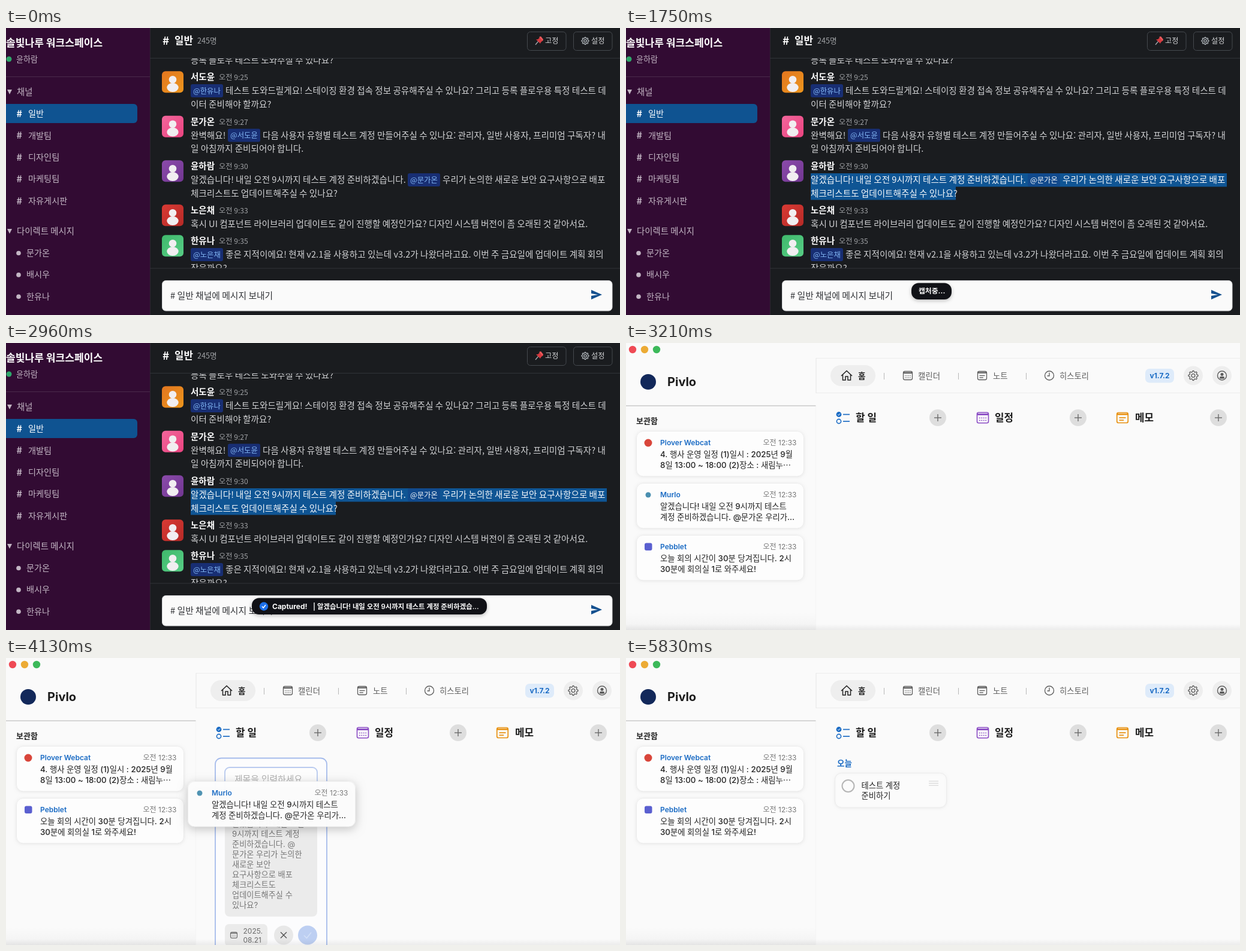
Animation, 1024 px wide and 480 px high, one loop 8000 ms. Source, as an HTML page with a canvas:

```html
<!DOCTYPE html>
<html lang="ko">
<head>
<meta charset="utf-8">
<style>
html, body { margin: 0; width: 100%; height: 100%; overflow: hidden; background: #fafafa; }
canvas { display: block; width: 1024px; height: 480px; }
</style>
</head>
<body>
<canvas id="stage" width="1024" height="480"></canvas>
<script>
const ctx = document.getElementById('stage').getContext('2d');
const LOOP = 8000;
const HANGUL = '"Noto Sans CJK KR", "Noto Sans CJK", "Noto Sans CJK JP", sans-serif';
const UI = 'Inter, ' + HANGUL;
const BLUE = '#1a6bc4';
let family = HANGUL;

// ---- helpers -------------------------------------------------------------
const ramp = (t, from, to) => {
  const p = Math.min(1, Math.max(0, (t - from) / (to - from)));
  return p * p * (3 - 2 * p);
};
const mix = (a, b, p) => a + (b - a) * p;

// cy is the optical middle of the glyphs
function text(str, x, cy, size, color, weight = 400, align = 'left') {
  ctx.font = `${weight} ${size}px ${family}`;
  ctx.textAlign = align;
  ctx.fillStyle = color;
  ctx.fillText(str, x, cy + size * 0.37);
}
function paint(fill, stroke, width = 1) {
  if (fill) { ctx.fillStyle = fill; ctx.fill(); }
  if (stroke) { ctx.strokeStyle = stroke; ctx.lineWidth = width; ctx.stroke(); }
}
function box(x, y, w, h, r, fill, stroke, width) {
  ctx.beginPath();
  ctx.roundRect(x, y, w, h, r);
  paint(fill, stroke, width);
}
function disc(x, y, r, fill, stroke, width) {
  ctx.beginPath();
  ctx.arc(x, y, r, 0, Math.PI * 2);
  paint(fill, stroke, width);
}
function path(points, fill, stroke, width) {
  ctx.beginPath();
  points.forEach(([x, y], i) => i ? ctx.lineTo(x, y) : ctx.moveTo(x, y));
  paint(fill, stroke, width);
}
const line = (x1, y1, x2, y2, color, width = 1) => path([[x1, y1], [x2, y2]], null, color, width);
function layer(alpha, draw) {
  ctx.save();
  ctx.globalAlpha *= alpha;
  draw();
  ctx.restore();
}
function shadow(color, blur, dy, draw) {
  ctx.save();
  ctx.shadowColor = color;
  ctx.shadowBlur = blur;
  ctx.shadowOffsetY = dy;
  draw();
  ctx.restore();
}
function shade(x, y, w, h, alpha) {
  const g = ctx.createLinearGradient(0, y, 0, y + h);
  g.addColorStop(0, 'rgba(0,0,0,0)');
  g.addColorStop(1, `rgba(0,0,0,${alpha})`);
  ctx.fillStyle = g;
  ctx.fillRect(x, y, w, h);
}
function gear(x, y, r, color) {
  ctx.beginPath();
  for (let i = 0; i <= 64; i++) {
    const a = i / 64 * Math.PI * 2;
    const d = r * (0.88 + 0.12 * Math.tanh(3 * Math.cos(8 * a)));
    ctx.lineTo(x + d * Math.cos(a), y + d * Math.sin(a));
  }
  paint(null, color, 1.3);
  disc(x, y, r * 0.36, null, color, 1.3);
}

// ---- chat ----------------------------------------------------------------
const CHANNELS = ['일반', '개발팀', '디자인팀', '마케팅팀', '자유게시판'];
const CONTACTS = ['문가온', '배시우', '한유나'];
const SELECTED = [
  [308, 254, '알겠습니다! 내일 오전 9시까지 테스트 계정 준비하겠습니다.'],
  [670, 254, '@문가온'],
  [728, 254, '우리가 논의한 새로운 보안 요구사항으로 배포'],
  [308, 276.5, '체크리스트도 업데이트해주실 수 있나요?'],
];
const MESSAGES = [
  { y: 82, name: '서도윤', time: '9:25', colors: ['#e27620', '#ec951c'], parts: [
    [308, 105, '@한유나'],
    [366, 105, '테스트 도와드릴게요! 스테이징 환경 접속 정보 공유해주실 수 있나요? 그리고 등록 플로우용 특정 테스트 데'],
    [308, 128, '이터 준비해야 할까요?']] },
  { y: 156.5, name: '문가온', time: '9:27', colors: ['#f2669c', '#ea437f'], parts: [
    [308, 179.5, '완벽해요!'],
    [370, 179.5, '@서도윤'],
    [428, 179.5, '다음 사용자 유형별 테스트 계정 만들어주실 수 있나요: 관리자, 일반 사용자, 프리미엄 구독자? 내'],
    [308, 202, '일 아침까지 준비되어야 합니다.']] },
  { y: 231, name: '윤하람', time: '9:30', colors: ['#8b4bab', '#713691'], parts: SELECTED },
  { y: 305, name: '노은채', time: '9:33', colors: ['#d93a34', '#b52a27'], parts: [
    [308, 328, '혹시 UI 컴포넌트 라이브러리 업데이트도 같이 진행할 예정인가요? 디자인 시스템 버전이 좀 오래된 것 같아서요.']] },
  { y: 356, name: '한유나', time: '9:35', colors: ['#3fb96c', '#57cd85'], parts: [
    [308, 379, '@노은채'],
    [366, 379, '좋은 지적이에요! 현재 v2.1을 사용하고 있는데 v3.2가 나왔더라고요. 이번 주 금요일에 업데이트 계획 회의'],
    [308, 402, '잡을까요?']] },
];

function messageParts(parts, color, pill, pillText) {
  for (const [x, y, str] of parts) {
    if (str[0] === '@') {
      box(x, y - 11, 54, 22, 3, pill);
      text(str, x + 4, y, 12.4, pillText, 500);
    } else text(str, x, y, 14.6, color);
  }
}
function avatar(x, y, colors) {
  const g = ctx.createLinearGradient(x, y, x + 36, y + 36);
  colors.forEach((c, i) => g.addColorStop(i, c));
  box(x, y, 36, 36, 6, g);
  disc(x + 18, y + 14, 6.3, '#f1eef1');
  ctx.beginPath();
  ctx.ellipse(x + 18, y + 27.3, 9.7, 7.6, 0, 0, Math.PI * 2);
  paint('#f1eef1');
}
function selection(p) {
  if (p <= 0) return;
  const reach = p * 936;
  ctx.save();
  ctx.beginPath();
  ctx.rect(308, 243, Math.min(694, reach), 22.5);
  if (reach > 694) ctx.rect(308, 265.5, reach - 694, 22);
  ctx.clip();
  ctx.fillStyle = '#0f5594';
  ctx.fillRect(308, 243, 694, 45);
  messageParts(SELECTED, '#f4f7fa', '#114a8d', '#f4f7fa');
  ctx.restore();
}
function sidebar() {
  ctx.fillStyle = '#320b33';
  ctx.fillRect(0, 0, 240, 480);
  text('솔빛나루 워크스페이스', 0, 25, 17.1, '#fff', 700);
  disc(5, 52, 4.5, '#2ea86b');
  text('윤하람', 17, 52, 13.1, '#c3b6c4');
  line(0, 81.5, 240, 81.5, '#4a2a4b');
  const heading = (str, y) => {
    path([[2, y - 4], [10, y - 4], [6, y + 4]], '#c3b6c4');
    text(str, 18, y, 14.4, '#c3b6c4');
  };
  heading('채널', 107);
  heading('다이렉트 메시지', 340);
  box(-6, 127, 225, 32, 6, '#0f5391');
  CHANNELS.forEach((name, i) => {
    const y = 143 + i * 36.4, color = i ? '#c3b6c4' : '#fff';
    text('#', 17.5, y, 16, color, 700);
    text(name, 37, y, 14.2, color);
  });
  CONTACTS.forEach((name, i) => {
    const y = 375.5 + i * 36.4;
    disc(21, y + 1, 3.8, '#c3b6c4');
    text(name, 34, y, 14.2, '#c3b6c4');
  });
}
function chatHeader() {
  text('#', 261, 21, 19, '#fff', 700);
  text('일반', 281, 21, 16.8, '#fff', 700);
  text('245명', 319, 21.5, 12.6, '#a3a5a8');
  line(240, 50.5, 1024, 50.5, '#303338');
  [[870, '고정'], [947, '설정']].forEach(([x, label]) => {
    box(x - 0.5, 6.5, 64.5, 31, 5, null, '#45494e');
    text(label, x + 29, 21.5, 12.2, '#d4d5d7');
  });
  line(883, 28, 888, 22, '#a8adb3', 1.2);
  path([[884, 19], [887, 19], [890, 16], [895, 21], [892, 24], [891, 26]], '#d63a3f');
  path([[889, 15], [892, 14], [896, 19], [895, 22]], '#ef5a5c');
  gear(966, 21.5, 6, '#aeb4b9');
}
function composer() {
  line(240, 402, 1024, 402, '#303338');
  box(260.5, 422.5, 750.5, 50.5, 6, '#fafafa', '#d5d6d8');
  text('# 일반 채널에 메시지 보내기', 274, 448, 14.8, '#303236');
  path([[976, 438], [994, 446], [976, 454], [976, 448], [987, 446], [976, 444]], '#14508f');
}
function toast(t) {
  family = UI;
  const pill = (x, w) => shadow('rgba(0,0,0,.25)', 6, 2, () => box(x, 426.5, w, 27.5, 12, '#111217'));
  if (t >= 1560 && t < 2140) layer(ramp(t, 1560, 1700), () => {
    pill(476, 67);
    text('캡처중...', 488, 440, 11.8, '#fff', 700);
  });
  if (t >= 2140) layer(ramp(t, 2140, 2240), () => {
    pill(410, 392);
    disc(430, 440.5, 7.2, '#1c6fe8');
    path([[427, 440.5], [429.2, 443], [433, 438]], null, '#fff', 1.5);
    text('Captured!', 444, 440.5, 12, '#fff', 700);
    text('| 알겠습니다! 내일 오전 9시까지 테스트 계정 준비하겠습...', 512, 440.5, 11.4, '#fff', 600);
  });
}
function chat(t) {
  family = HANGUL;
  ctx.fillStyle = '#1a1c1f';
  ctx.fillRect(0, 0, 1024, 480);
  sidebar();
  line(240.5, 0, 240.5, 480, '#2d2530');
  chatHeader();
  ctx.save();
  ctx.beginPath();
  ctx.rect(241, 51, 783, 350.5);
  ctx.clip();
  text('등록 플로우 테스트 도와주실 수 있나요?', 308, 54, 14.6, '#d2d3d5');
  for (const m of MESSAGES) {
    avatar(260, m.y - 9.8, m.colors);
    text(m.name, 308, m.y, 14.5, '#fff', 700);
    text('오전 ' + m.time, 355, m.y + 0.8, 12.2, '#9fa1a4');
    messageParts(m.parts, '#d2d3d5', '#182e73', '#82b7f5');
  }
  selection(ramp(t, 240, 880));
  ctx.restore();
  composer();
  toast(t);
}

// ---- organiser -----------------------------------------------------------
const CLIPS = {
  web: { app: 'Plover Webcat', logo: () => disc(20, 20, 6.5, '#d9463b'),
    lines: ['4. 행사 운영 일정 (1)일시 : 2025년 9월', '8일 13:00 ~ 18:00 (2)장소 : 새림누⋯'] },
  chat: { app: 'Murlo', logo: () => disc(20, 20, 4.5, '#4a8fb0'),
    lines: ['알겠습니다! 내일 오전 9시까지 테스트', '계정 준비하겠습니다. @문가온 우리가...'] },
  call: { app: 'Pebblet', logo: () => box(14, 13.5, 12.5, 12.5, 3, '#5a5fd0'),
    lines: ['오늘 회의 시간이 30분 당겨집니다. 2시', '30분에 회의실 1로 와주세요!'] },
};
const NOTE = ['알겠습니다! 내일 오전', '9시까지 테스트 계정', '준비하겠습니다. @', '문가온 우리가 논의한',
  '새로운 보안', '요구사항으로 배포', '체크리스트도', '업데이트해주실 수', '있나요?'];
const TITLE = ['테스트 계정', '준비하기'];

function clip(item, x, y, { scale = 1, alpha = 1, lifted = false } = {}) {
  layer(alpha, () => {
    ctx.translate(x + 140, y + 38);
    ctx.scale(scale, scale);
    ctx.translate(-140, -38);
    shadow(lifted ? 'rgba(0,0,0,.24)' : 'rgba(0,0,0,.08)', lifted ? 16 : 5, lifted ? 4 : 1,
      () => box(0, 0, 280, 76, 11, '#fdfdfd'));
    box(0.5, 0.5, 279, 75.5, 11, null, lifted ? '#eeeeee' : '#ebebeb');
    item.logo();
    text(item.app, 40, 19.5, 12, BLUE, 600);
    text('오전 12:33', 267.5, 19.5, 12, '#777', 400, 'right');
    item.lines.forEach((s, i) => text(s, 40, 39.5 + i * 17.3, 13.35, '#222', 500));
  });
}
function calendarIcon(x, y, w, h, color, width = 1.3) {
  box(x - w / 2, y - h / 2, w, h, 2.5, null, color, width);
  line(x - w / 2, y - h * 0.32, x + w / 2, y - h * 0.32, color, h * 0.16);
  for (const row of [0.02, 0.25])
    for (const col of [-0.27, -0.09, 0.09, 0.27])
      disc(x + col * w, y + row * h, w * 0.05, color);
}
function noteIcon(x, y, w, h, color, width = 1.3) {
  box(x - w / 2, y - h / 2, w, h, 2.5, null, color, width);
  line(x - w / 2, y - h * 0.34, x + w / 2, y - h * 0.34, color, h * 0.15);
  line(x - w * 0.3, y, x + w * 0.3, y, color, width);
  line(x - w * 0.3, y + h * 0.24, x + w * 0.12, y + h * 0.24, color, width);
}
function navigation() {
  const gray = '#5c5c5c';
  line(317, 25.5, 1024, 25.5, '#ececec');
  line(317, 83.5, 1024, 83.5, '#ececec');
  line(317, 25, 317, 84, '#e6e6e6');
  box(341, 37, 75, 35, 17.5, '#eeeeee');
  path([[359, 55], [368, 46.5], [377, 55]], null, '#222', 1.6);
  path([[361.5, 53], [361.5, 62], [366, 62], [366, 56], [370, 56], [370, 62], [374.5, 62], [374.5, 53]], null, '#222', 1.5);
  text('홈', 387, 55, 13.5, '#222', 700);
  for (const x of [430.5, 554.5, 667.5]) line(x, 50, x, 61, '#b8b8b8');
  calendarIcon(470, 54.5, 15, 14, gray);
  text('캘린더', 487, 55, 13.4, gray, 500);
  noteIcon(594, 54.5, 15, 14, gray);
  text('노트', 612, 55, 13.4, gray, 500);
  disc(706, 54.5, 7.5, null, gray, 1.3);
  path([[706, 49.5], [706, 55], [702.5, 55]], null, gray, 1.3);
  text('히스토리', 723, 55, 13.3, gray, 500);
  box(866, 43, 48, 23.5, 7, '#deebfa');
  text('v1.7.2', 890, 55, 12, BLUE, 700, 'center');
  disc(946, 54.5, 16, '#eeeeee');
  gear(946, 54.5, 8, gray);
  disc(994, 54.5, 16, '#eeeeee');
  disc(994, 54.5, 7.5, null, gray, 1.4);
  disc(994, 52.5, 2.5, gray);
  box(990, 56, 8, 3.8, 2, gray);
}
function columns() {
  disc(355, 119.5, 4.4, BLUE);
  path([[353, 119.5], [354.6, 121], [357.2, 118]], null, '#fff', 1);
  disc(355, 131, 3.6, null, BLUE, 1.6);
  line(362, 119.5, 373, 119.5, BLUE, 1.7);
  line(362, 131, 373, 131, BLUE, 1.7);
  calendarIcon(595, 125, 19, 17.5, '#8a4bc4', 1.6);
  noteIcon(828, 125, 18.5, 17, '#e8900f', 1.7);
  ['할 일', '일정', '메모'].forEach((name, i) => {
    const x = 520 + i * 234;
    text(name, [383, 615, 849][i], 125, 16.9, '#1c1c1c', 700);
    disc(x, 125, 14, 'rgba(0,0,0,.11)');
    line(x - 6, 125, x + 6, 125, '#6a6a6a', 1.4);
    line(x, 119, x, 131, '#6a6a6a', 1.4);
  });
}
function dropZone() {
  shadow('rgba(120,150,200,.25)', 6, 0, () => box(334, 100, 215, 420, 14, '#e4eaf4'));
  box(341.5, 107.5, 202, 420, 9, '#e8eef7');
  ctx.setLineDash([5, 4]);
  box(341.5, 107.5, 202, 420, 9, null, '#abbfe0', 1.5);
  ctx.setLineDash([]);
}
function form(t) {
  const letters = Math.floor(11 * Math.min(1, Math.max(0, (t - 4400) / 700)));
  box(349, 167.5, 186, 332, 10, '#fcfcfd', '#a6bcec', 1.8);
  box(365, 183, 154, 58, 8, '#fdfdfd', '#b9caef', 1.8);
  if (!letters) text('제목을 입력하세요', 381, 203, 14.8, '#b0b0b0');
  TITLE.forEach((s, i) => text(s.slice(0, Math.max(0, letters - i * 7)), 381, 203 + i * 20, 14.8, '#222'));
  box(365, 257, 154, 175.5, 8, '#ebebeb');
  NOTE.forEach((s, i) => text(s, 377, 277 + i * 17, 13.2, '#777'));
  box(365, 445, 71, 37, 7, '#ebebeb');
  calendarIcon(380, 463.5, 11, 10, '#666', 1.1);
  text('2025.', 395.5, 457, 12, '#6a6a6a');
  text('08.21', 395.5, 471.5, 12, '#6a6a6a');
  disc(463, 463.5, 16, '#e8e8e8');
  line(458, 458.5, 468, 468.5, '#555', 1.4);
  line(468, 458.5, 458, 468.5, '#555', 1.4);
  disc(503, 463.5, 16, letters ? '#3f78dc' : '#bdcff2');
  path([[497, 464], [501.5, 468.5], [509, 459]], null, letters ? '#fff' : '#d3e0f7', 1.6);
}
function task() {
  text('오늘', 352, 176, 13.5, BLUE, 700);
  shadow('rgba(0,0,0,.05)', 4, 1, () => box(348.5, 192.5, 186, 57.5, 11, '#fbfbfb', '#ececec'));
  disc(370.5, 214, 10, null, '#b5b5b5', 2);
  TITLE.forEach((s, i) => text(s, 392.5, 213 + i * 17, 13.3, '#222', 500));
  for (const y of [206, 209.5, 213]) line(505, y, 521, y, '#d0d0d0');
}
function organiser(t) {
  const DRAG = 3300, DROP = 4030, RELEASE = 4250, SUBMIT = 5400;
  family = UI;
  ctx.fillStyle = '#fafafa';
  ctx.fillRect(0, 0, 1024, 480);
  shade(0, 450, 316, 30, 0.03);
  ['#ef4a55', '#ecab35', '#3cb95a'].forEach((c, i) => disc(11 + i * 20, 11, 6.2, c));

  disc(37, 65, 13, '#12285a');
  text('Pivlo', 69, 65, 20, '#1c1c1c', 700);
  line(0, 105, 316.5, 105, '#c9c9c9', 1.3);
  text('보관함', 17, 130, 13, '#222', 700);
  line(316.5, 106, 316.5, 480, '#f4f4f4');
  clip(CLIPS.web, 17, 147);
  if (t < DRAG) clip(CLIPS.chat, 17, 234);
  else if (t < DROP) clip(CLIPS.chat, 17, 234, { scale: 0.95, alpha: 0.5 });
  clip(CLIPS.call, 17, mix(321, 234, ramp(t, DROP, DROP + 90)));

  navigation();
  if (t >= 3420 && t < DROP) dropZone();
  columns();
  if (t >= DROP && t < SUBMIT) layer(ramp(t, DROP, DROP + 100), () => form(t));
  if (t >= SUBMIT) layer(ramp(t, SUBMIT, SUBMIT + 150), task);

  if (t >= DRAG && t < RELEASE) {
    const out = ramp(t, DRAG, 3500), on = ramp(t, 3500, 3900);
    clip(CLIPS.chat, mix(mix(17, 236, out), 303, on), mix(mix(234, 221.5, out), 206, on),
      { alpha: 0.97 * (1 - ramp(t, 4150, RELEASE)), lifted: true });
  }
  shade(0, 470, 1024, 10, 0.06);
}

function frame() {
  const t = performance.now() % LOOP;
  if (t < 3180) chat(t); else organiser(t);
  requestAnimationFrame(frame);
}
frame();
</script>
</body>
</html>
```
